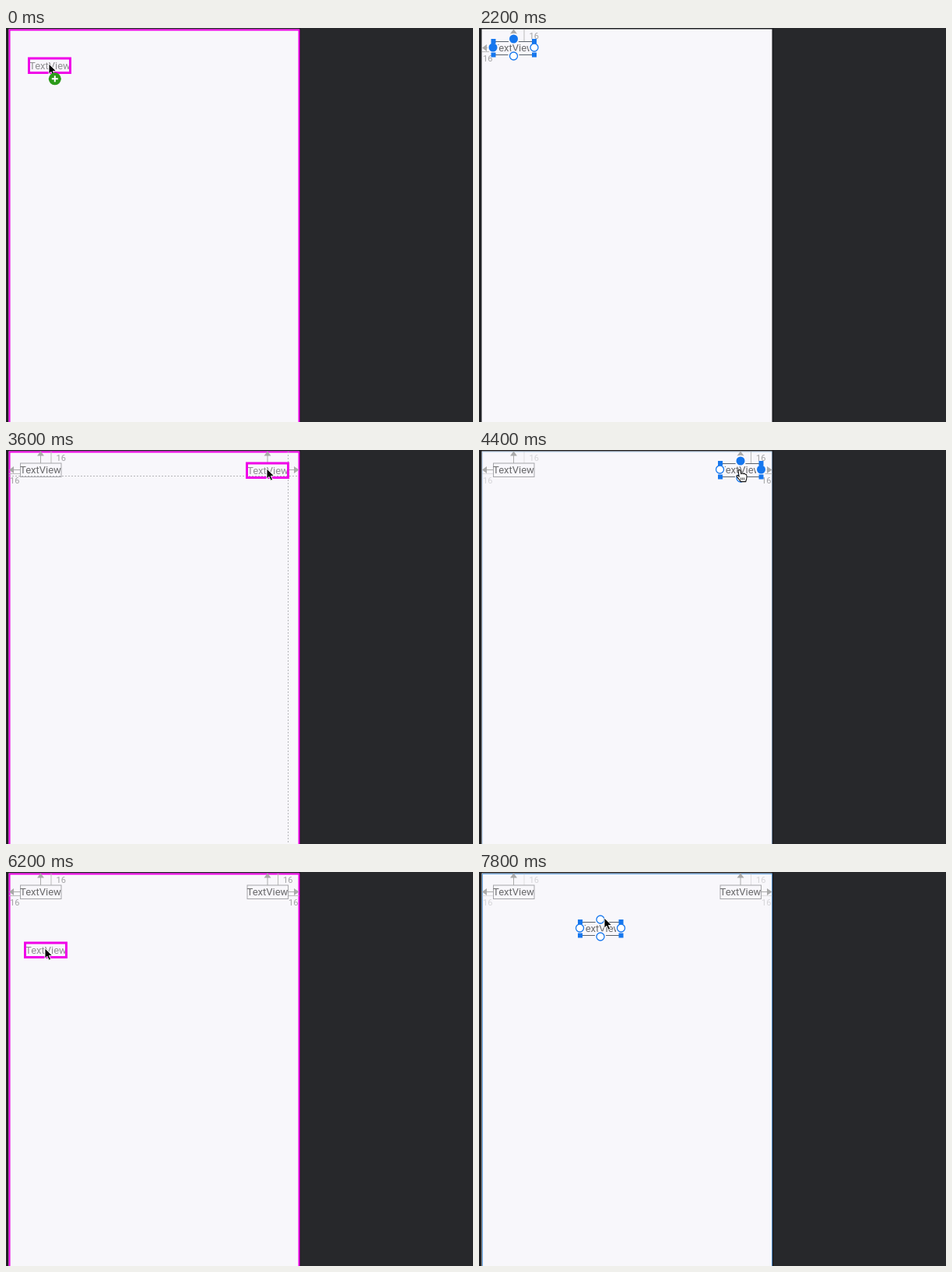
Animation of 600 by 506 pixels, one loop 8000 ms. Source, as an HTML page:

```html
<!DOCTYPE html>
<html lang="en">
<head>
<meta charset="utf-8">
<title>Layout editor</title>
<style>
  html, body { margin: 0; width: 100%; height: 100%; overflow: hidden; background: #27282b; }
  svg { display: block; width: 100%; height: 100%; }
  text { font-family: Roboto, "Liberation Sans", sans-serif; }
</style>
</head>
<body>
<svg id="stage" viewBox="0 0 600 506"></svg>
<script>
const LOOP = 8000, STEP = 200;
const W = 53, H = 18;
const PAPER = '#f8f7fb', BLUE = '#1677ee', PINK = '#f000e8', GREY = '#aaa';
const LEFT = { x: 18, y: 17 }, RIGHT = { x: 309.5, y: 17 }, MIDDLE = { x: 129.5, y: 64 };
const stage = document.getElementById('stage');

// Drag paths: [time, x, y]
const drags = [
  [[0, 29.5, 39], [200, 26, 34], [400, 22, 26], [600, 18, 20], [800, 18, 17], [1200, 18, 17]],
  [[2600, 12, 60], [2800, 190, 48], [3000, 345.5, 39], [3200, 359, 32], [3400, 330, 22], [3600, 309.5, 17]],
  [[6000, 4, 98], [6400, 45, 84], [6800, 112.5, 65], [7000, 129.5, 64]]
];

const clamp = v => Math.max(0, Math.min(1, v));
const ramp = (t, a, b) => clamp((t - a) / (b - a));

function at(path, t) {
  let i = 1;
  while (i < path.length - 1 && path[i][0] < t) i++;
  const [a, b] = [path[i - 1], path[i]], k = ramp(t, a[0], b[0]);
  return { x: a[1] + (b[1] - a[1]) * k, y: a[2] + (b[2] - a[2]) * k };
}

const rect = (x, y, w, h, attrs) => `<rect x="${x}" y="${y}" width="${w}" height="${h}" ${attrs}/>`;
const path = (d, attrs) => `<path d="${d}" ${attrs}/>`;
const circle = (x, y, r, attrs) => `<circle cx="${x}" cy="${y}" r="${r}" ${attrs}/>`;
const text = (x, y, size, fill, s) => `<text x="${x}" y="${y}" font-size="${size}" fill="${fill}">${s}</text>`;
const group = (alpha, s) => alpha > 0 ? `<g opacity="${alpha}">${s}</g>` : '';

const label = ({ x, y }) => text(x, y + 13.2, 13, '#6a6a6c', 'TextView');

const outline = ({ x, y }) =>
  rect(x + .5, y, W - .5, H - .5, 'fill="none" stroke="#a6a6aa"');

// Arrows and margins towards the top and the nearer side
function margins(p, numbers) {
  const right = p.x > 200, cx = p.x + W / 2;
  const edge = right ? 376.5 : 4, near = right ? p.x + W : p.x;
  const tip = right ? 370 : 10;
  return path(`M${cx} 7V17M${tip} 25.5H${near}`, `stroke="${GREY}"`) +
    path(`M${cx} 1.5l4.5 6h-9zM${edge} 25.5L${tip} 21v9z`, `fill="${GREY}"`) +
    group(numbers,
      path(`M${cx + 13.5} 2V17M${edge} 30.5H${near}`, 'stroke="#bbb"') +
      text(cx + 20, 14, 11, '#a2a2a4', '16') +
      text(right ? 363 : 5, 43, 11, '#a2a2a4', '16'));
}

function selection({ x, y }, filled) {
  const cx = x + W / 2, cy = y + 8;
  const spots = { top: [cx, y - 3], left: [x, cy], right: [x + W, cy], bottom: [cx, y + 19] };
  let s = path(`M${x} ${y + .5}h${W}M${x} ${y + 17.5}h${W}`, 'stroke="#59616b"');
  for (const [px, py] of Object.values(spots)) s += circle(px, py, 7.3, `fill="${PAPER}"`);
  for (const px of [x + .5, x + W])
    for (const py of [y, y + H - .5]) s += rect(px - 3, py - 3, 6, 6, `fill="${BLUE}"`);
  for (const [name, [px, py]] of Object.entries(spots))
    s += filled.includes(name) ? circle(px, py, 5.5, `fill="${BLUE}"`)
      : circle(px, py, 5, `fill="#fff" stroke="${BLUE}" stroke-width="1.3"`);
  return s;
}

const arrow = (x, y) =>
  path(`M${x} ${y}v13l3-2.8 2.2 5 2.4-1-2.2-4.8h4.2z`, 'fill="#000" stroke="#fff" stroke-width=".9"');

const hand = (x, y) => path(
  `M${x} ${y}q1.8-1.6 2.8.6l1 4 1.2-.8 1.5.8 1.4-.4 1.3 1 1.3.2q1.2 3 .2 5.6l-1 3.6h-6.4l-2.6-3.4-2.6-3q-.6-1.8 1.2-1.6l1.8 1.4z`,
  'fill="#fff" stroke="#111" stroke-width="1.1"') +
  path(`M${x + 3.6} ${y + 9.5}v3M${x + 5.6} ${y + 9.5}v3M${x + 7.6} ${y + 9.5}v3`, 'stroke="#111" stroke-width=".8"');

function dragged(p, badge) {
  const { x, y } = p;
  let s = text(x + .5, y + 13.5, 13, 'rgba(0,0,0,.42)', 'TextView') +
    rect(x, y, W, 18.5, `fill="none" stroke="${PINK}" stroke-width="3"`) +
    arrow(x + 25.5, y + 7);
  if (badge) {
    const bx = x + 33.3, by = y + 26.3;
    s += circle(bx, by, 8, 'fill="#2c9a1a"') +
      path(`M${bx - 4} ${by}h8M${bx} ${by - 4}v8`, 'stroke="#fff" stroke-width="2"');
  }
  return s;
}

const guide = d => path(d, 'stroke="#b4b4b8" stroke-dasharray="2 2"');

function border(color, width, alpha) {
  return group(alpha, rect(4.5, 2.5, 372, 520, `fill="none" stroke="${color}" stroke-width="${width}"`));
}

function draw(t) {
  const drag = drags.findIndex(d => t >= d[0][0] && t <= d[d.length - 1][0]);
  const dragging = drag >= 0;
  let s = rect(0, 0, 600, 506, 'fill="#27282b"') + rect(0, 0, 3, 506, 'fill="#202124"') +
    rect(0, 0, 378, 1.5, 'fill="#202124"') + rect(376, 0, 3, 506, 'fill="#202124"') +
    rect(3.5, 1.5, 373, 505, `fill="${PAPER}"`);

  if (dragging) s += border(PINK, 2, 1);
  else if (t === 1400) s += border('#4a96e0', 1, .8);
  else if (t >= 3800 && t < 5400) s += border('#4a96e0', 1, t < 4400 ? 1 - .7 * ramp(t, 3800, 4400) : .3 * (1 - ramp(t, 4800, 5400)));
  else if (t >= 7200) s += border('#4a96e0', 1, .85);

  if (t >= 1400) {
    if (t < 2600) {
      s += margins(LEFT, 1) + label(LEFT) + selection(LEFT, ['top', 'left']);
      if (t < 2000) s += hand(43, 26);
      else if (t < 2200) s += hand(45, 28);
    } else {
      const fade = t >= 4800 && t < 6000 ? 1 - ramp(t, 4800, 5400) : 1;
      const numbers = dragging ? 1 : t < 6000 ? 1 - .6 * ramp(t, 3600, 4400) : 1 - .6 * ramp(t, 7000, 7800);
      s += group(fade, margins(LEFT, numbers) + outline(LEFT)) + label(LEFT);
      if (t >= 3800 && t < 6000) {
        s += margins(RIGHT, 1) + label(RIGHT) + selection(RIGHT, ['top', 'right']);
        if (t < 5000) s += hand(333, 26);
      } else if (t >= 6000) {
        s += margins(RIGHT, numbers) + outline(RIGHT) + label(RIGHT);
      }
    }
  }

  if (dragging) {
    const p = at(drags[drag], t);
    if (drag === 0 && t >= 200) {
      s += guide('M18.5 2V506') + guide('M4 17.5H376');
      if (t >= 800) s += margins(LEFT, 0);
    }
    if (drag === 1 && t >= 3000) {
      s += guide('M4 33.5H376');
      if (t === 3600) s += guide('M362.5 2V506') + margins(RIGHT, 0);
    }
    s += dragged(p, drag === 0);
  }

  if (t >= 7200) s += label(MIDDLE) + selection(MIDDLE, []) + arrow(161, 59);
  stage.innerHTML = s;
}

let shown = -1;
const start = performance.now();
function tick() {
  const t = Math.floor((performance.now() - start) % LOOP / STEP) * STEP;
  if (t !== shown) draw(shown = t);
  requestAnimationFrame(tick);
}
tick();
</script>
</body>
</html>
```
